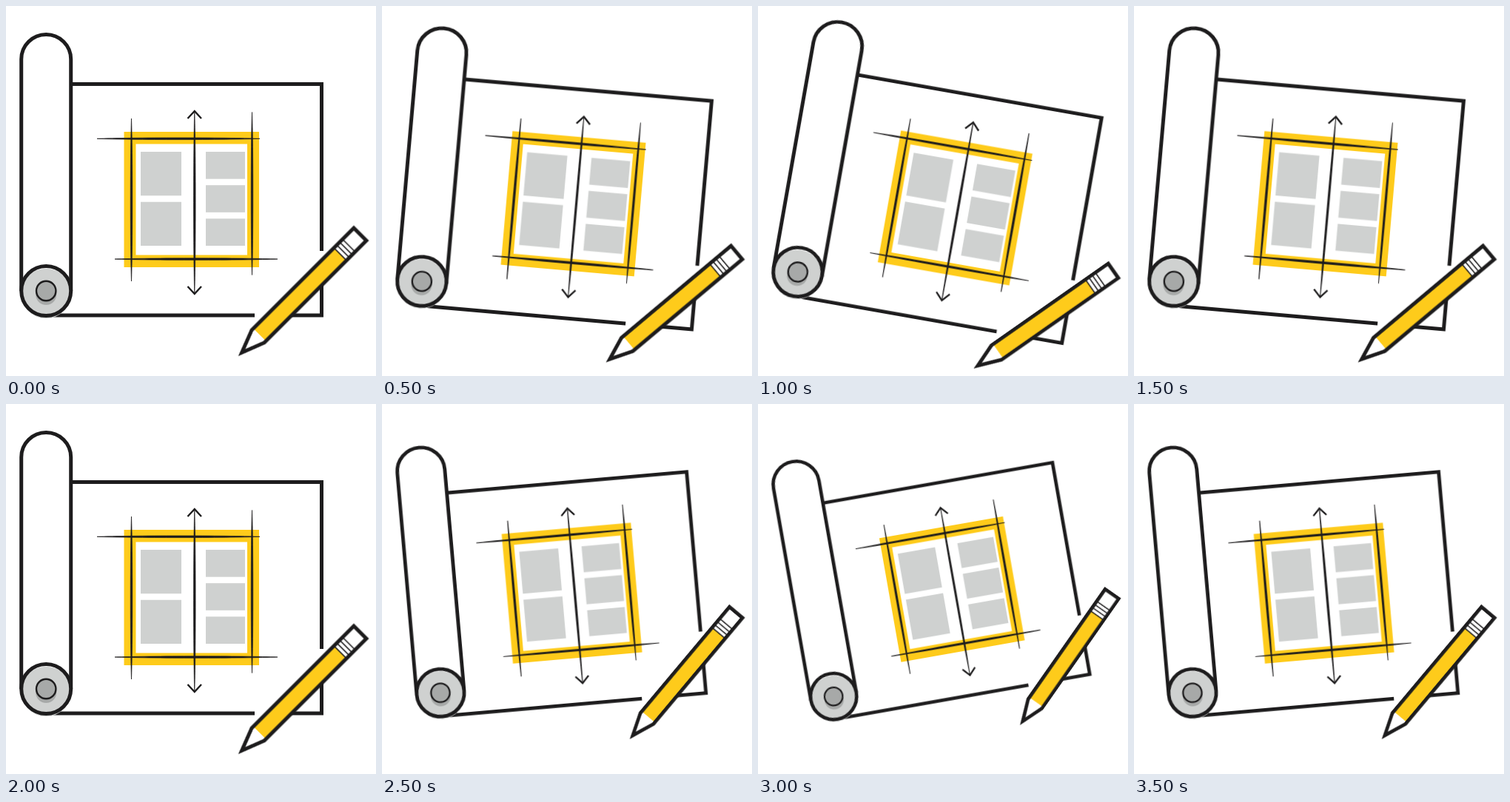
Animation of 500x500 px, one loop 4 s. Source, as an HTML page:

```html
<!DOCTYPE html>
<html lang="en">
<head>
<meta charset="utf-8">
<title>Blueprint</title>
<style>
  html, body { margin: 0; width: 100%; height: 100%; overflow: hidden; background: #fff; }
  svg { display: block; width: 100vw; height: 100vh; }
  .ink { fill: none; stroke: #1d1c1d; stroke-width: 5; }
  .thin { stroke-width: 2.4; }
  .fine { stroke-width: 1.6; }
  .white { fill: #fff; }
  .yellow { fill: #fecb1b; }
  .pane { fill: #cfd1d0; }
  .dark { fill: #a7a9a8; }
  .sketch { fill: #1d1c1d; stroke: #1d1c1d; stroke-width: .7; }
</style>
</head>
<body>
<svg viewBox="0 0 500 500">
  <g id="art">
    <path class="ink" d="M88 105.5H426.5V331M426.5 372V418H380M336 418H54"/>

    <g id="roll" transform="translate(54.2 385)">
      <path class="ink white" d="M-33.5 0V-313A33.5 33.5 0 0 1 33.5 -313V0"/>
      <circle class="white" r="33.5"/>
      <circle class="pane" cy="3.5" r="33.7"/>
      <circle class="ink" r="33.5"/>
      <circle class="dark" cy="5" r="14"/>
      <circle class="ink thin dark" r="13.2" style="fill:#a7a9a8"/>
    </g>

    <path class="yellow" fill-rule="evenodd" d="M159.5 170H342V353H159.5ZM175.5 186.5V336.5H326V186.5Z"/>
    <g class="pane" id="panes"></g>
    <g class="sketch" id="lines"></g>
    <path class="ink thin" d="M245.5 152L254.8 142L264 152M245.5 379L254.8 389L264 379"/>

    <g transform="translate(478.5 308.5) rotate(135)">
      <path class="white" d="M0 -12H195L226 0L195 12H0Z"/>
      <path class="yellow" d="M38 -12H192V12H38Z"/>
      <path class="ink fine" id="bands"/>
      <path class="ink" d="M0 -12H195L226 0L195 12H0Z"/>
    </g>
  </g>
</svg>
<script>
const $ = id => document.getElementById(id);
const range = n => [...Array(n).keys()];

// A column of equal panes filling the window height
function column(x, w, n) {
  const top = 197, height = 127, gap = 8.5;
  const h = (height - gap * (n - 1)) / n;
  return range(n).map(i =>
    `<rect x="${x}" y="${top + i * (h + gap)}" width="${w}" height="${h}"/>`).join('');
}
$('panes').innerHTML = column(182, 55, 2) + column(270, 53, 3);

// A pen stroke that narrows to a point at both ends
function taper(x, y, angle, len = 220) {
  const w = 1.7, a = len * 0.2, b = len * 0.8;
  return `<path transform="translate(${x} ${y}) rotate(${angle})"
    d="M0 0C${a} ${w} ${b} ${w} ${len} 0C${b} ${-w} ${a} ${-w} 0 0"/>`;
}
$('lines').innerHTML =
  taper(123, 179.3, 0) + taper(147, 342, 0) +
  taper(169.5, 152, 90) + taper(332.5, 143.5, 90) +
  taper(254.8, 142, 90, 247);

$('bands').setAttribute('d', range(4).map(i => `M${21.5 + i * 5.5} -12v24`).join(''));

// Outermost parts of the drawing: x, y, radius
const hull = [[54, 72, 36], [54, 385, 36], [490, 316, 0], [315, 471, 0]];

// Tilt the drawing, then fit it to the same width around the same middle
function pose(deg) {
  const a = deg * Math.PI / 180, c = Math.cos(a), s = Math.sin(a);
  const xs = hull.flatMap(([x, y, r]) => [x * c - y * s - r, x * c - y * s + r]);
  const ys = hull.flatMap(([x, y, r]) => [x * s + y * c - r, x * s + y * c + r]);
  const left = Math.min(...xs), k = 472 / (Math.max(...xs) - left);
  const mid = (Math.min(...ys) + Math.max(...ys)) / 2;
  const m = [k * c, k * s, -k * s, k * c, 18 - k * left, 253.5 - k * mid];
  return `matrix(${m.map(v => v.toFixed(5)).join(',')})`;
}

// Triangle wave between -10 and 10 degrees, held in eight steps
const steps = 8, swing = 10;
const tilt = i => swing * Math.asin(Math.sin(i / steps * 2 * Math.PI)) / (Math.PI / 2);
$('art').animate(
  range(steps + 1).map(i => ({ transform: pose(tilt(i)), offset: i / steps, easing: 'step-end' })),
  { duration: 4000, iterations: Infinity }
);
</script>
</body>
</html>
```
